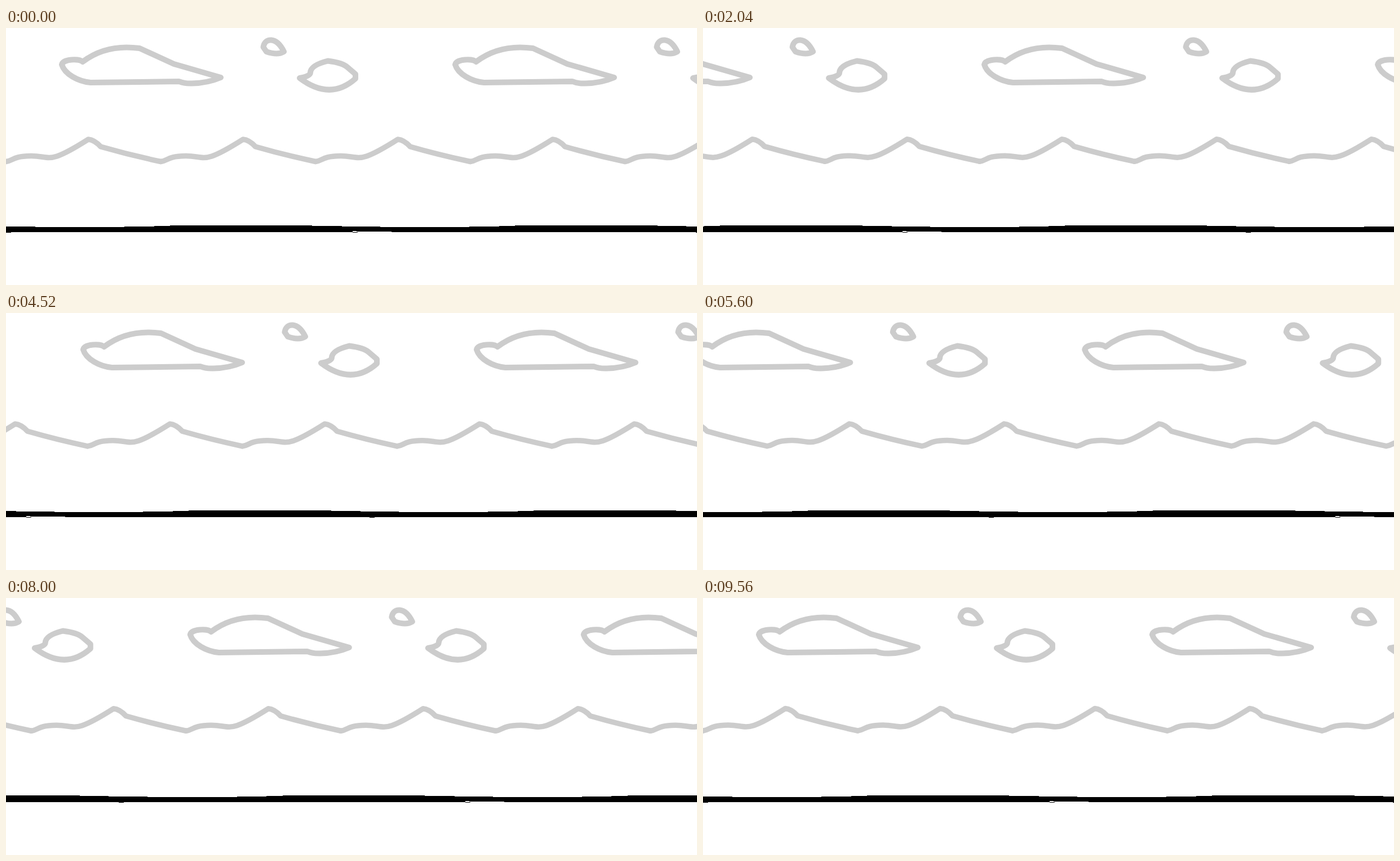
Write an HTML page that moves like this. It is 1226 px wide and 457 px high and loops after 9600 ms.

```html
<!DOCTYPE html>
<html lang="en">
<head>
<meta charset="utf-8">
<title>Scrolling landscape</title>
<style>
html, body { margin: 0; width: 100%; height: 100%; overflow: hidden; background: #fff; }
svg { display: block; width: 100%; height: 100%; }
.ink { fill: none; stroke: #ccc; stroke-linejoin: round; stroke-linecap: round; }
</style>
</head>
<body>
<svg viewBox="0 0 1226 457">
  <defs>
    <g id="cloud" class="ink" stroke-width="10">
      <path d="M136 60C130 54 101 55 99 65C104 82 128 95 150 97L307 95Q316 99 330 98.5Q358 98 381 88Q350 79 298 64L237 36Q178 28 136 60Z"/>
      <path d="M456.5 34C459 17 480 15 493 42Q482 49 462 42Z"/>
      <path d="M521 89Q540 86 540 79Q541 66 571 58.5Q598 62 606 70L620 82V90Q575 130 521 89Z"/>
    </g>
    <path id="hill" class="ink" stroke-width="9.5"
      d="M0 237.5C14 236 10 228 44 227.5C80 227 72 245 146 198Q157 199 168 211Q220 226 274.6 237.5"/>
    <path id="strip" d="M-.5 352.6C60 354 120 354.5 200 353.6S290 351 310 350.8H455Q540 351 612.5 353V363H-.5Z"/>
    <g id="soil" shape-rendering="crispEdges">
      <use href="#strip"/>
      <use href="#strip" x="612"/>
      <path d="M0 361.4L100 363V364H0Z" fill="#fff"/>
      <path d="M0 363h9v1h-9zM609 363h9v1h-9z"/>
    </g>
  </defs>
</svg>
<script>
const LOOP = 9600, STEP = 40, LAST = LOOP / STEP - 1;
const WIDTH = 1226;
const svg = document.querySelector('svg');

// A row of equal tiles that moves left by whole tiles over one loop.
function makeLayer(id, tile, turns, start = 0, rise = 0) {
  const group = document.createElementNS(svg.namespaceURI, 'g');
  const count = Math.ceil(WIDTH / tile) + turns + 1;
  for (let i = -1; i < count; i++) {
    group.innerHTML += `<use href="#${id}" x="${i * tile}"/>`;
  }
  svg.append(group);
  return p => group.setAttribute('transform', `translate(${start - turns * tile * p} ${-rise * p})`);
}

const layers = [
  makeLayer('cloud', 698, 2),
  makeLayer('hill', 274.6, 1, 0, 1.5),
  makeLayer('soil', 1224, 1, 615)
];

function draw(ms) {
  const p = Math.floor(ms % LOOP / STEP) / LAST;
  layers.forEach(move => move(p));
}

const start = performance.now();
function tick() {
  draw(performance.now() - start);
  requestAnimationFrame(tick);
}
tick();
</script>
</body>
</html>
```
